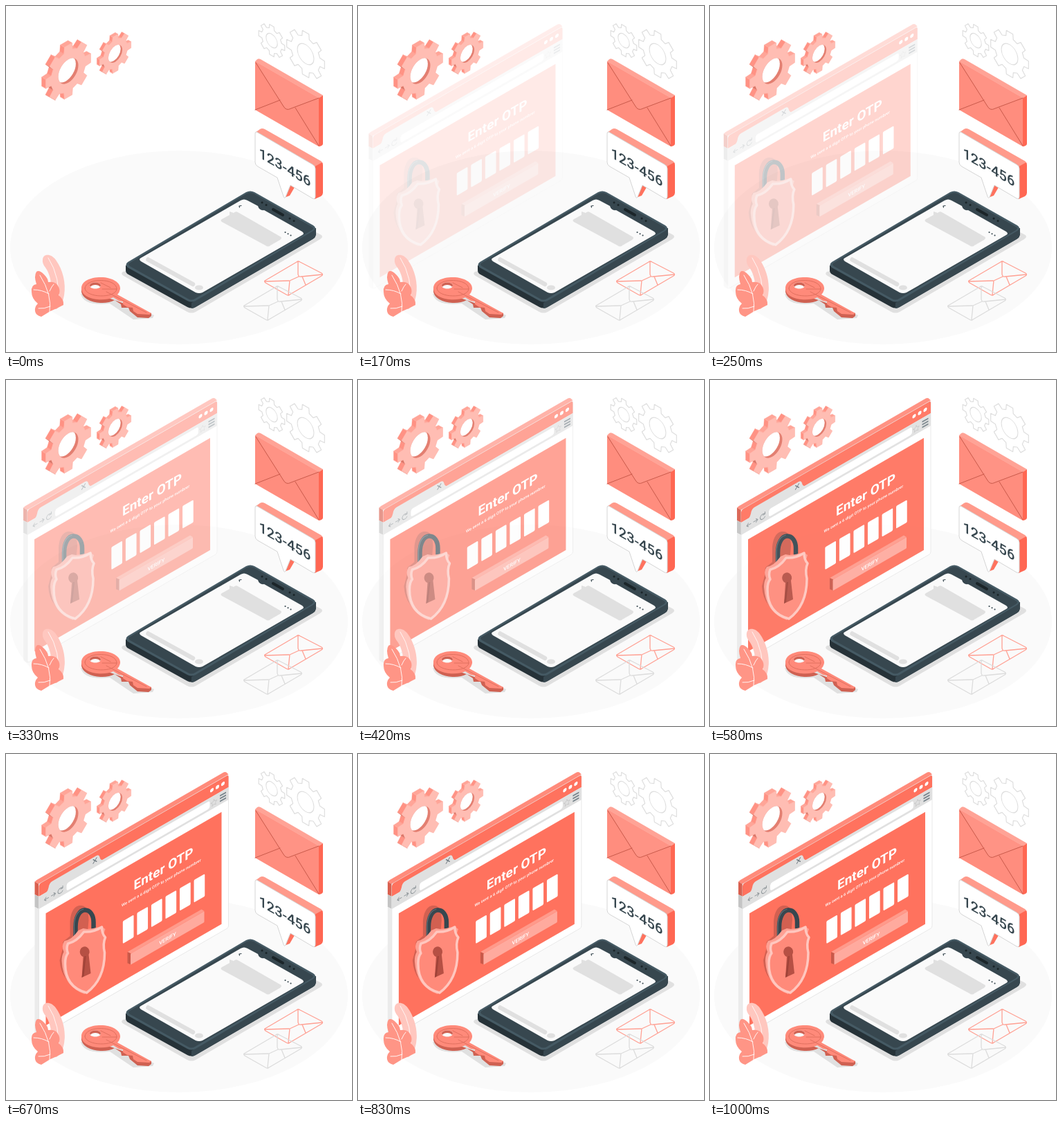
An HTML page that plays this animation: 500x500 px, repeating every 1040 ms.

```html
<!DOCTYPE html>
<html lang="en">
<head>
<meta charset="utf-8">
<title>One-time password</title>
<style>
  html, body { margin: 0; width: 100%; height: 100%; overflow: hidden; background: #fff; }
  svg { display: block; width: 100%; height: 100%; }
  text { font-family: Roboto, "Liberation Sans", sans-serif; }
</style>
</head>
<body>
<svg viewBox="0 0 500 500" fill="none" stroke-linecap="round" stroke-linejoin="round">
  <ellipse cx="250" cy="349" rx="244" ry="140" fill="#fafafa"/>
  <g id="gears"></g>

  <g id="browser">
    <!-- slab edges -->
    <path d="M41 184.500 L44 182 L314 26.500 Q316 25.500 318 26.500 L321 29.500 L47 188Z" fill="#ff8b7b"/>
    <path d="M41 184.500 L47 188 V206 L41 203Z" fill="#d95f4e"/>
    <path d="M41 203 L47 206 V224 L41 221Z" fill="#c4c4c4"/>
    <path d="M41 221 L47 224 V409 L43 406.500 Q41 405.500 41 403Z" fill="#ebebeb"/>
    <g transform="matrix(1 -.577 0 1 47 188)">
      <path d="M0 0 H271 Q274 0 274 3 V218 Q274 221 271 221 H3 Q0 221 0 218Z" fill="#fff" stroke="#e3e3e3" stroke-width=".8"/>
      <path d="M0 18 V3 Q0 0 3 0 H271 Q274 0 274 3 V18Z" fill="#ff725e"/>
      <path d="M0 18 H274 V36 H0Z M11 18 Q13 17 14 13 Q15 7 19 7 H83 Q87 7 88 12 Q89 17 92 18Z" fill="#e0e0e0"/>
      <rect x="40" y="22" width="207" height="11" rx="3" fill="#fff"/>
      <g fill="#fff"><circle cx="250" cy="8.500" r="2.600"/><circle cx="258" cy="8.500" r="2.600"/><circle cx="266" cy="8.500" r="2.600"/></g>
      <path d="M78.500 10 l5 5.500 m0 -5.500 l-5 5.500" stroke="#6f7a80" stroke-width="1.200"/>
      <path d="M14 27.500 H8 m2.500 -2.500 l-2.500 2.500 l2.500 2.500 M18 27.500 h6 m-2.500 -2.500 l2.500 2.500 l-2.500 2.500 M34 25 a3.700 3.700 0 1 0 .5 4 M34.500 22.500 v3 h-3" stroke="#90979b" stroke-width="1"/>
      <path d="M253 23.500 l1.300 3 3.200 .3 -2.400 2.200 .7 3.200 -2.800 -1.700 -2.800 1.700 .7 -3.200 -2.400 -2.200 3.200 -.3Z" stroke="#c7c7c7" stroke-width=".8"/>
      <path d="M261.500 23.500 h9 m-9 4 h9 m-9 4 h9" stroke="#77838a" stroke-width="2" stroke-linecap="butt"/>
      <path d="M10 48 H264 V210 H10Z" fill="#ff725e"/>
      <g fill="#fff">
        <text x="137" y="88" font-size="19" font-weight="700">Enter OTP</text>
        <text x="119.500" y="102" font-size="5.750" font-weight="500">We sent a 6 digit OTP to your phone numbrer</text>
        <g id="digits"></g>
      </g>
      <path d="M128.500 172 H235 L239 177 H133Z" fill="#ff9a8b"/>
      <path d="M128 172 L133 177 V193 L128 188Z" fill="#c9594a"/>
      <rect x="132.500" y="177" width="106.500" height="16" rx="1" fill="#ffaa9e"/>
      <text x="186" y="188.500" font-size="7.500" font-weight="500" text-anchor="middle" fill="#fff">VERIFY</text>
    </g>
    <!-- padlock -->
    <path d="M92 263 V245 C92 228 99 218 108 219 C117 219 119 230 119 240 L110 340 Q79 331 77 298 L82 279 Q80 270 86 268Z" fill="#d26051"/>
    <path d="M100 268 V250 C100 235 106 226 113 225.500 C121 225 126 233 126 243 V258" stroke="#37474f" stroke-width="6.500"/>
    <path d="M98 264 V249 C98 234 104 226 111 224.500" stroke="#607078" stroke-width="1.200"/>
    <path id="shieldBack" d="M84 270 Q94 269 104 255 L111 252 L117 253 Q128 252 137 249 L143 253 L113 347 Q82 336 80 299 Q80 291 83 286 Q79 277 84 270Z" fill="#ffa093"/>
    <path d="M89 274 Q102 271 112 257 Q126 258 138 250 Q138 260 143 265 Q139 274 142 287 Q142 326 116 345 Q85 337 85 303 Q85 292 89 288 Q86 281 89 274Z" fill="#ff8a7a" stroke="#ffc7bf" stroke-width="3.500"/>
    <path d="M111 293 A7 7.500 0 1 1 119 290 L122 317 L109 323Z" fill="#b65044"/>
    <path d="M113 292 L109 323 L112 321 L115 292Z" fill="#9f4238"/>
  </g>

  <!-- leaves -->
  <path d="M53 366 C54 357 66 358 72 367 C82 381 87 400 84 418 Q82 431 73 438 L63 437 C69 410 65 389 57 378 Q52 372 53 366Z" fill="#ffc7bf"/>
  <path d="M61 364 Q79 391 76 433" stroke="#fff" stroke-width=".8"/>
  <path d="M44 384 Q48 381 55 388 Q61 394 61 399 Q72 397 76 406 Q79 412 76 418 Q84 424 83 432 Q74 437 64 441 L51 449 Q43 447 42 441 Q41 435 46 430 Q37 423 37 413 Q36 403 44 402 Q40 390 44 384Z" fill="#ff9586"/>
  <path d="M49 389 Q67 417 63 442 M40 410 Q52 410 62 416 M47 437 Q55 438 64 434 M69 402 Q66 405 63 412" stroke="#fff" stroke-width=".9"/>

  <!-- coral envelope -->
  <path d="M360 80 L363 77 Q365 75.500 368 77 L458 129 L452 133Z" fill="#ffa396"/>
  <path d="M452 133 L458 129 V199 Q458 202 452 203Z" fill="#ff6753"/>
  <path d="M360 80 L452 133 V203 L360 150Z" fill="#ff8d7e"/>
  <path d="M360 80 L401 145 Q405 152 412 148 L452 133Z" fill="#ff9385"/>
  <path d="M361 82 L401 145 Q405 152 412 148 L452 133 M360 150 L396 136 M418 147 L452 202" stroke="#c95a4b" stroke-width="1"/>

  <!-- speech box -->
  <path d="M360 183 L367 178 Q370 176 374 178 L455 224 Q458 226 456 228 L447 233Z" fill="#ff9a8b"/>
  <path d="M446 232 L457 226 Q458 227 458 230 V270 Q458 273 455 275 L446 279Z" fill="#ff6753"/>
  <path d="M402 277 L411 258 L417 262 L410 274Z" fill="#ff725e"/>
  <path d="M360 185 Q360 180 364 183 L443 229 Q447 231 447 235 V275 Q447 280 443 278 L411 259 L404 276 Q402 279 401 275 L392 248 L364 232 Q360 230 360 226Z" fill="#fff" stroke="#d5d5d5" stroke-width="1"/>
  <text transform="matrix(1 .577 0 1 365.500 218.500)" font-size="20" font-weight="500" fill="#37474f">123-456</text>

  <!-- phone -->
  <path d="M169 384 Q165 387 170 390 L262 442 Q268 445 274 442 L454 337 Q460 333 454 330 L440 323Z" fill="#e0e0e0"/>
  <path d="M173 375 V382 Q173 386 177 388 L262 435 Q268 438 274 435 L443 337 Q448 334 448 329 V321Z" fill="#263238"/>
  <path d="M268 429 V437 Q271 437 274 435 L443 337 Q448 334 448 329 V321Z" fill="#37474f"/>
  <path d="M176 370 L347 269 Q353 266 359 269 L444 317 Q450 321 444 325 L274 426 Q268 429 262 426 L176 378 Q171 374 176 370Z" fill="#455a64"/>
  <path d="M179 371 L348 271 Q353 269 358 271 L442 319 Q446 321 442 324 L273 423 Q268 426 263 423 L179 376 Q175 373 179 371Z" fill="#37474f"/>
  <path d="M195 364 L339 281 Q344 278 349 281 L364 289 Q366 296 373 295 L428 326 Q432 329 428 331 L284 414 Q279 416 274 414 L195 369 Q191 366 195 364Z" fill="#fafafa"/>
  <path d="M386 294 L400 302" stroke="#1b2529" stroke-width="4"/>
  <path d="M370 284 h.1 M376 287.500 h.1 M410 307 h.1 M416 310.500 h.1" stroke="#1b2529" stroke-width="3"/>
  <path d="M312 308 L323 302 L323 297 L329 299 Q332 296 335 298 L396 333 Q400 335 396 338 L382 346 Q379 349 375 346 L312 312 Q309 310 312 308Z" fill="#e0e0e0"/>
  <path d="M205.500 366.500 L270 402" stroke="#e0e0e0" stroke-width="6.500"/>
  <ellipse cx="279" cy="407" rx="6" ry="3.600" fill="#e0e0e0"/>
  <path d="M403.500 327 h.1 M407.500 329.300 h.1 M411.500 331.600 h.1" stroke="#37474f" stroke-width="2"/>
  <path d="M340 288.500 L337 289 L337.500 291" stroke="#37474f" stroke-width="1.200"/>

  <!-- key -->
  <path d="M108 416 Q112 434 150 430 L184 453 L212 451 L214 447 L166 420Z" fill="#e0e0e0"/>
  <g id="keyBase" fill="#cf6152">
    <path d="M109 408 V413 C112 429 143 433 157 425 L166 431 L167 436 L177 436 L179 441 L190 450 L206 451 L210 448 V444Z"/>
  </g>
  <path fill="#ff8a7a" fill-rule="evenodd" d="M109 408 C109 398 121 392 137 392 C154 392 166 400 165 409 Q164 414 161 417 L210 444 L207 446 L190 445 L184 441 L183 436 L175 435 L169 431 L169 427 L163 426 L155 421 C140 428 109 424 109 408Z M121 404 C121 410 137 410 137 404 C137 398 121 398 121 404Z"/>
  <path d="M121 404 C121 398 137 398 137 404 L136 406 C134 402 124 402 122 406Z" fill="#cf6152"/>
  <path d="M114 408 C115 392 160 393 160 409 C158 423 115 422 114 408 M139 409 L160 409 M145 413 L203 443 M137 400 L151 407" stroke="#e0705f" stroke-width="1"/>

  <!-- outlined envelopes -->
  <g id="outline" stroke-width="1.300">
    <g id="letter" stroke="#ffa093"><path d="M374 397 L420 370 Q422 368 425 370 L456 386 Q459 388 456 390 L410 417 Q408 419 405 417 L375 400 Q373 398 374 397Z M422 370 L422 387 Q422 392 427 391 L457 388 M374 398 L409 397 M408 417 L410 397 L423 391 M428 391 L433 403"/></g>
    <use href="#lines" x="-30" y="36" stroke="#dcdcdc"/>
  </g>
</svg>
<script>
const $ = id => document.getElementById(id);
const point = p => p.map(n => n.toFixed(2)).join(" ");
const poly = (points, attrs) => `<path d="M${points.map(point).join("L")}Z" ${attrs}/>`;

// Eight-toothed wheel in an isometric wall; slope is -.5 or .5.
function wheel(cx, cy, radius, slope) {
  const points = [];
  for (let i = 0; i < 8; i++) {
    for (const [r, spread] of [[.77, -.25], [1, -.17], [1, .17], [.77, .25]]) {
      const a = i * Math.PI / 4 + spread;
      const u = radius * r * Math.cos(a), v = radius * r * Math.sin(a);
      points.push([cx + .866 * u, cy + slope * u + v]);
    }
  }
  return points;
}

const hole = (cx, cy, r, slope, attrs) =>
  `<circle r="${r}" transform="matrix(.866 ${slope} 0 1 ${cx} ${cy})" ${attrs}/>`;

function solidGear(id, cx, cy, radius, depth) {
  const face = wheel(cx, cy, radius, -.5);
  const dx = -depth, dy = -depth * .577;
  const shift = ([x, y]) => [x + dx, y + dy];
  let out = "";
  face.forEach((a, i) => {
    const b = face[(i + 1) % face.length];
    const ex = b[0] - a[0], ey = b[1] - a[1];
    if (ey * dx - ex * dy <= 0) return;
    const down = -ex / Math.hypot(ex, ey);
    const color = down > .3 ? "#d97466" : down < -.6 ? "#ffa598" : "#ff9284";
    out += poly([a, b, shift(b), shift(a)], `fill="${color}" stroke="${color}" stroke-width=".4"`);
  });
  const r = radius * .44;
  return out + poly(face, 'fill="#ffbdb3" stroke="#ffb0a4" stroke-width=".6"')
    + `<clipPath id="${id}">${hole(cx, cy, r, -.5, "")}</clipPath>`
    + hole(cx, cy, r, -.5, 'fill="#e37f71"')
    + `<g clip-path="url(#${id})">${hole(cx + dx * .6, cy + dy * .6, r, -.5, 'fill="#fff"')}</g>`;
}

function lineGear(cx, cy, radius) {
  const attrs = 'stroke="#dedede" stroke-width="1.2"';
  return poly(wheel(cx, cy, radius, .5), attrs) + hole(cx, cy, radius * .43, .5, attrs);
}

$("gears").innerHTML = solidGear("holeA", 90, 94, 38, 6) + solidGear("holeB", 158, 69, 26.5, 4)
  + lineGear(433, 69.5, 32) + lineGear(384, 50, 22);

$("digits").innerHTML = Array.from({ length: 6 }, (_, i) =>
  `<rect x="${121.3 + 20.55 * i}" y="123.5" width="15.7" height="32.5" rx="1.5"/>`).join("");

// The grey letter repeats the coral one's lines.
const lines = $("letter").firstElementChild;
lines.id = "lines";

const LOOP = 1040, STEP = 1000 / 24;
const browser = $("browser");
const bezier = (s, p1, p2) => 3 * (1 - s) ** 2 * s * p1 + 3 * (1 - s) * s * s * p2 + s ** 3;

// cubic-bezier(.36, -.01, .5, 1.38)
function ease(x) {
  let low = 0, high = 1;
  for (let i = 0; i < 24; i++) {
    const mid = (low + high) / 2;
    if (bezier(mid, .36, .5) < x) low = mid; else high = mid;
  }
  return bezier(low, -.01, 1.38);
}

function draw(time) {
  const t = time % LOOP;
  const step = Math.min(24, Math.floor((t + 4) / STEP));
  const value = step < 2 ? 0 : ease(Math.min(1, step / 24 + .035));
  browser.setAttribute("transform", `translate(${(30 * (value - 1)).toFixed(2)} 0)`);
  browser.setAttribute("opacity", Math.max(0, Math.min(1, value)).toFixed(3));
}

const start = performance.now();
function tick() {
  draw(performance.now() - start);
  requestAnimationFrame(tick);
}
tick();
</script>
</body>
</html>
```
